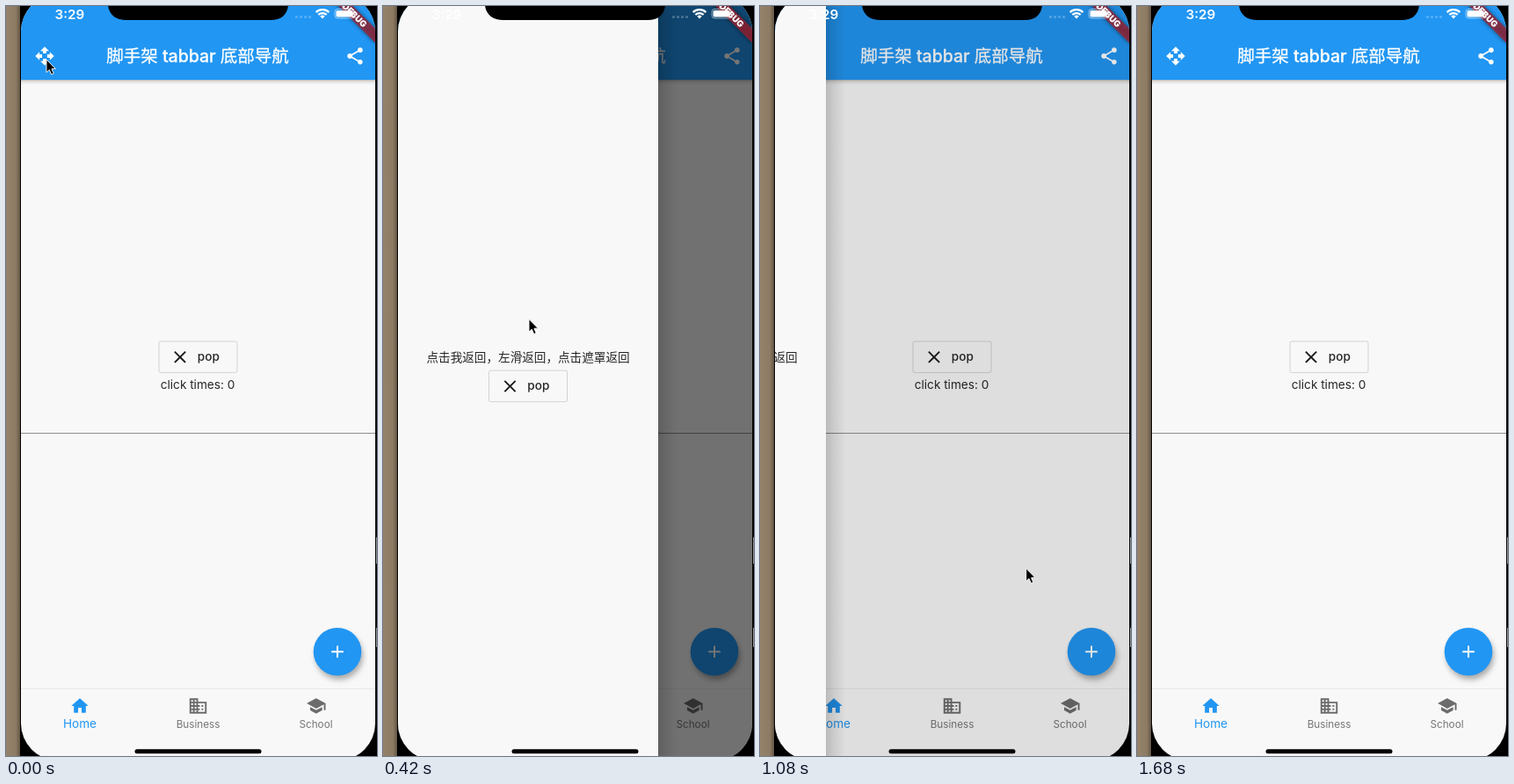
Recreate the animation shown at these times as an HTML page. Size 422 px wide and 854 px high, loop 1.74 s.

```html
<!DOCTYPE html>
<html lang="zh-CN">
<head>
<meta charset="utf-8">
<title>Drawer demo</title>
<style>
  html, body { margin: 0; width: 100%; height: 100%; overflow: hidden; background: #000; }
  svg { display: block; width: 422px; height: 854px; }
  text { font-family: Inter, "Noto Sans CJK SC", "Noto Sans CJK", sans-serif; font-size: 13.6px; fill: #262626; }
  .mid { text-anchor: middle; }
  .medium { font-weight: 500; }
  .title { font-size: 19.5px; stroke: #fff; stroke-width: .3; }
  .tab { font-size: 11.7px; fill: #757575; }
  .gray { fill: #6c6c6c; }
  .blue { fill: #2196f3; }
  .white { fill: #fff; }
</style>
</head>
<body>
<svg viewBox="0 0 422 854">
  <defs>
    <linearGradient id="wall">
      <stop offset="0" stop-color="#95826a"/>
      <stop offset=".7" stop-color="#8d7b63"/>
      <stop offset="1" stop-color="#655746"/>
    </linearGradient>
    <linearGradient id="shadeDown" x2="0" y2="1">
      <stop offset="0" stop-opacity=".25"/>
      <stop offset=".4" stop-opacity=".08"/>
      <stop offset="1" stop-opacity="0"/>
    </linearGradient>
    <linearGradient id="shadeRight">
      <stop offset="0" stop-opacity=".16"/>
      <stop offset=".45" stop-opacity=".08"/>
      <stop offset="1" stop-opacity="0"/>
    </linearGradient>
    <filter id="blur" x="-50%" y="-50%" width="200%" height="200%">
      <feGaussianBlur stdDeviation="3"/>
    </filter>
    <clipPath id="screen"><rect x="17" y="-13" width="403" height="872" rx="42"/></clipPath>
    <clipPath id="buttonArea"><rect x="120.5" y="415" width="89" height="35.5" rx="2"/></clipPath>
    <g id="popButton">
      <rect x="174" y="381.9" width="89" height="35.5" rx="2" fill="none" stroke="#000" stroke-opacity=".15"/>
      <path transform="translate(198 399.8) scale(.9735) translate(-12 -12)" fill="#1c1c1c"
        d="M19 6.41L17.59 5 12 10.59 6.41 5 5 6.41 10.59 12 5 17.59 6.41 19 12 13.41 17.59 19 19 17.59 13.41 12z"/>
      <text class="medium" x="217.8" y="404.3">pop</text>
    </g>
  </defs>

  <rect width="16" height="854" fill="url(#wall)"/>
  <path d="M16 810V854H60V840z"/>
  <path d="M421.5 605v30M421.5 708v22" stroke="#999"/>

  <g clip-path="url(#screen)">
    <rect x="17" y="-13" width="403" height="872" fill="#f8f8f8"/>
    <rect x="17" y="84" width="403" height="6" fill="url(#shadeDown)"/>
    <rect class="blue" x="17" y="-13" width="403" height="97"/>
    <circle id="menuSplash" class="white" cx="44" cy="57"/>
    <path class="white icon" data-at="44 57" d="M10 9h4V6h3l-5-5-5 5h3v3zm-1 1H6V7l-5 5 5 5v-3h3v-4zm14 2l-5-5v3h-3v4h3v3l5-5zm-9 3h-4v3H7l5 5 5-5h-3v-3z"/>
    <text class="mid medium white title" x="218" y="64">脚手架 tabbar 底部导航</text>
    <path class="white icon" data-at="397 57" d="M18 16.08c-.76 0-1.44.3-1.96.77L8.91 12.7c.05-.23.09-.46.09-.7s-.04-.47-.09-.7l7.05-4.11c.54.5 1.25.81 2.04.81 1.66 0 3-1.34 3-3s-1.34-3-3-3-3 1.34-3 3c0 .24.04.47.09.7L8.04 9.81C7.5 9.31 6.79 9 6 9c-1.66 0-3 1.34-3 3s1.34 3 3 3c.79 0 1.5-.31 2.04-.81l7.12 4.16c-.05.21-.08.43-.08.65 0 1.61 1.31 2.92 2.92 2.92 1.61 0 2.92-1.31 2.92-2.92s-1.31-2.92-2.92-2.92z"/>

    <use href="#popButton"/>
    <text class="mid" x="218" y="436">click times: 0</text>
    <path d="M17 486.5H420" stroke="#8f8f8f"/>

    <path d="M17 777.5H420" stroke="#000" stroke-opacity=".06"/>
    <path class="blue icon" data-at="84 797" d="M10 20v-6h4v6h5v-8h3L12 3 2 12h3v8z"/>
    <path class="gray icon" data-at="218.5 797" d="M12 7V3H2v18h20V7H12zM6 19H4v-2h2v2zm0-4H4v-2h2v2zm0-4H4V9h2v2zm0-4H4V5h2v2zm4 12H8v-2h2v2zm0-4H8v-2h2v2zm0-4H8V9h2v2zm0-4H8V5h2v2zm10 12h-8v-2h2v-2h-2v-2h2v-2h-2V9h8v10zm-2-8h-2v2h2v-2zm0 4h-2v2h2v-2z"/>
    <path class="gray icon" data-at="352.8 797" d="M5 13.18v4L12 21l7-3.82v-4L12 17l-7-3.82zM12 3L1 9l11 6 9-4.91V17h2V9L12 3z"/>
    <text class="mid blue" x="84" y="822">Home</text>
    <text class="mid tab" x="218.5" y="822">Business</text>
    <text class="mid tab" x="352.5" y="822">School</text>

    <circle cx="379" cy="740" r="27" fill-opacity=".32" filter="url(#blur)"/>
    <circle class="blue" cx="377" cy="735.3" r="27.3"/>
    <path class="white icon" data-at="377 735.3" d="M19 13h-6v6h-2v-6H5v-2h6V5h2v6h6v2z"/>

    <rect id="scrim" x="17" y="-13" width="403" height="872"/>
    <g id="drawer">
      <rect x="313" y="-13" width="22" height="872" fill="url(#shadeRight)"/>
      <rect x="17" y="-13" width="296" height="872" fill="#f8f8f8"/>
      <text x="49.5" y="404.8">点击我返回，左滑返回，点击遮罩返回</text>
      <g clip-path="url(#buttonArea)"><circle id="popSplash" cx="185" cy="430" fill="#8799a8"/></g>
      <use href="#popButton" x="-53.5" y="33.2"/>
    </g>

    <g transform="translate(420 -13) rotate(45) scale(.9735)">
      <rect x="-40" y="28" width="80" height="12" fill-opacity=".5" filter="url(#blur)"/>
      <rect x="-40" y="28" width="80" height="12" fill="#a02030" fill-opacity=".75"/>
      <text class="mid white" y="37.7" style="font-size:10.2px;font-weight:900">DEBUG</text>
    </g>
  </g>

  <path d="M116 -1C117 10 125 16 137 16H301C313 16 320 10 321 -1z"/>
  <text class="white" x="55.5" y="14.8" style="font-size:15.2px;font-weight:600">3:29</text>
  <path d="M329 12.5h18" stroke="#fff" stroke-opacity=".25" stroke-width="2.5" stroke-dasharray="3 2"/>
  <g fill="none" stroke="#fff" stroke-width="2.2">
    <path d="M352.6 7.1a10.6 10.6 0 0 1 14.8 0M355.3 10a6.7 6.7 0 0 1 9.4 0"/>
    <path class="white" stroke="none" d="M357.3 11.7a4 4 0 0 1 5.4 0L360 14.6z"/>
  </g>
  <rect x="374" y="3.5" width="22" height="10.5" rx="3" fill="none" stroke="#fff" stroke-opacity=".5"/>
  <rect class="white" x="375.5" y="5" width="19" height="7.5" rx="1.6"/>
  <path class="white" d="M397.5 7q2 1.7 0 3.5z" fill-opacity=".5"/>
  <rect x="146.5" y="846.3" width="144" height="5" rx="2.5"/>

  <path id="cursor" d="M0 0V14.6L3.3 11.6 5.7 17 8.2 15.9 5.9 10.7 10.3 10.4z" stroke="#fff" stroke-width=".9"/>
</svg>

<script>
  const LOOP = 1740, STEP = 60, DRAWER_WIDTH = 296;
  const byId = id => document.getElementById(id);
  const clamp = v => Math.min(1, Math.max(0, v));

  for (const icon of document.querySelectorAll('.icon'))
    icon.setAttribute('transform', `translate(${icon.dataset.at}) scale(.9735) translate(-12 -12)`);

  // Distance left of a critically damped spring, rate per ms.
  const spring = (ms, rate) => {
    const x = Math.max(0, ms) * rate;
    return (1 + x) * Math.exp(-x);
  };

  function openness(t) {
    const p = t < 700 ? 1 - spring(t - 95.5, .0325) : spring(t - 940.5, .0216);
    return p < .002 ? 0 : p;
  }

  // time, x, y
  const pointer = [
    [0, 46, 61], [120, 46, 62], [240, 102, 158], [360, 152, 305], [480, 180, 408],
    [560, 185, 428], [890, 185, 428], [960, 218, 493], [1140, 345, 714], [1260, 430, 862]
  ];

  function pointerAt(t) {
    const next = pointer.findIndex(k => k[0] > t);
    if (next < 0) return [430, 862];
    const [a, b] = [pointer[next - 1], pointer[next]];
    const f = (t - a[0]) / (b[0] - a[0]);
    return [a[1] + (b[1] - a[1]) * f, a[2] + (b[2] - a[2]) * f];
  }

  function splash(id, age, speed, maxRadius, strength, life) {
    const circle = byId(id);
    circle.setAttribute('r', Math.min(maxRadius, Math.max(0, age * speed)));
    circle.setAttribute('opacity', age < 0 ? 0 : strength * clamp(2 * (1 - age / life)));
  }

  function draw(now) {
    const t = Math.floor(now % LOOP / STEP) * STEP;
    const p = openness(t);
    byId('drawer').setAttribute('transform', `translate(${Math.round((p - 1) * DRAWER_WIDTH)})`);
    byId('drawer').setAttribute('visibility', p ? 'visible' : 'hidden');
    byId('scrim').setAttribute('opacity', .54 * p);
    byId('cursor').setAttribute('transform', `translate(${pointerAt(t)})`);
    splash('menuSplash', t - 10, .3, 33, .2, 300);
    splash('popSplash', t - 880, .2, 70, .32, 270);
  }

  let start;
  function tick(now) {
    start ??= now;
    draw(now - start);
    requestAnimationFrame(tick);
  }
  draw(0);
  requestAnimationFrame(tick);
</script>
</body>
</html>
```
